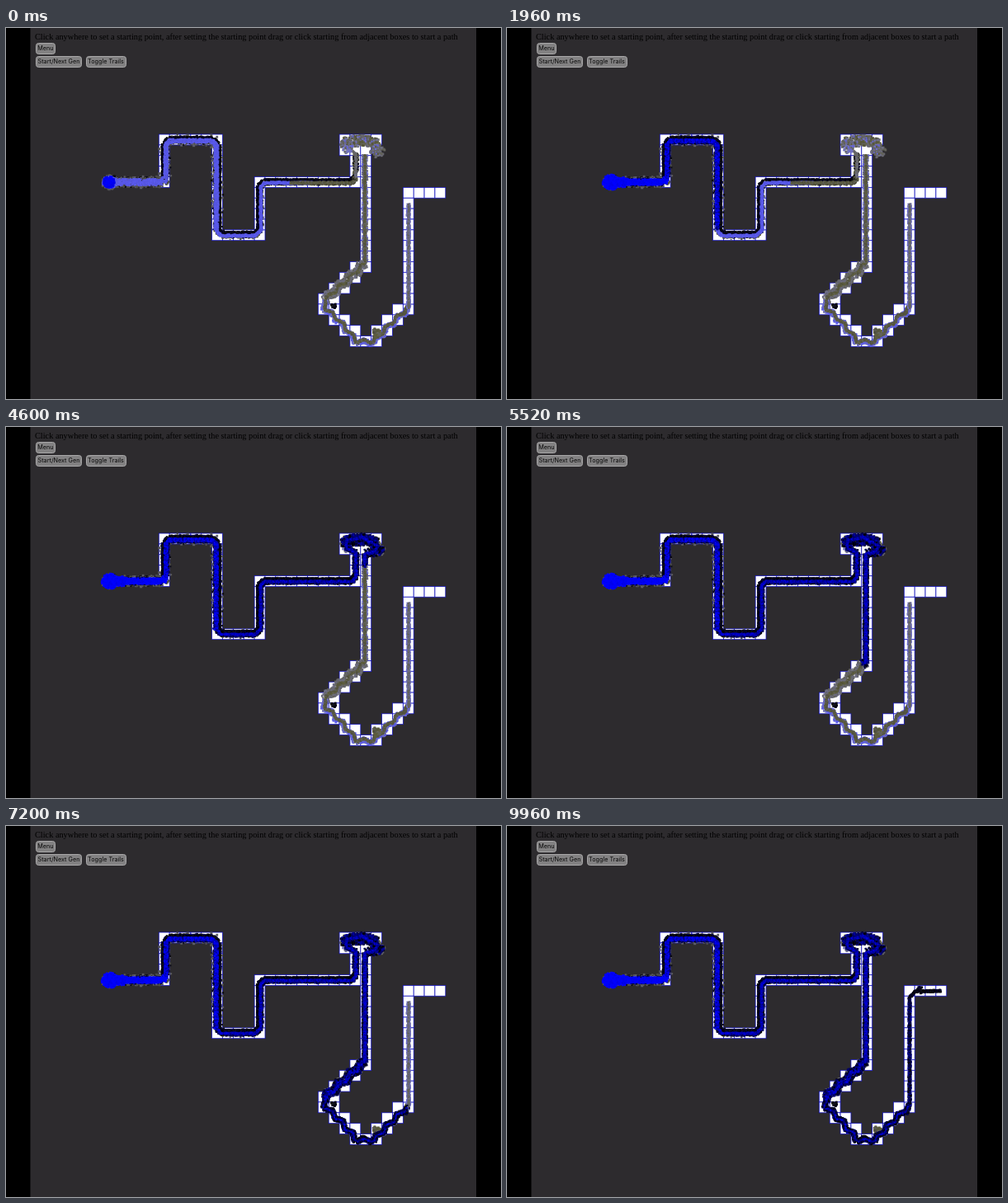
Recreate the animation shown at these times as an HTML page with a canvas. Size 600x450 px, loop 10000 ms.

```html
<!DOCTYPE html>
<html lang="en">
<head>
<meta charset="utf-8">
<title>Path swarm</title>
<style>
html, body { margin: 0; width: 100%; height: 100%; overflow: hidden; background: #000; }
#stage { position: absolute; left: 0; top: 0; width: 600px; height: 450px; overflow: hidden; }
canvas { position: absolute; left: 0; top: 0; }
p { position: absolute; left: 35px; top: 5px; margin: 0; white-space: nowrap; color: #000;
  font: 10.31px/12px "Liberation Serif", Times, serif; }
.button { position: absolute; box-sizing: border-box; height: 14px; border: 1px solid #a9a8a9;
  border-radius: 3.5px; background: #828182; color: #080808; text-align: center; white-space: nowrap;
  font: 7.25px/12px Inter, Arial, sans-serif; }
</style>
</head>
<body>
<div id="stage">
  <canvas id="view" width="600" height="450"></canvas>
  <p>Click anywhere to set a starting point, after setting the starting point drag or click starting from adjacent boxes to start a path</p>
  <div class="button" style="left:36px;top:18px;width:24px">Menu</div>
  <div class="button" style="left:36px;top:34px;width:56px">Start/Next Gen</div>
  <div class="button" style="left:96.5px;top:34px;width:49px">Toggle Trails</div>
</div>
<script>
const LOOP = 10000;
const CELL = 12.87, GRID_X = 185.3, GRID_Y = 129;
const ctx = document.getElementById('view').getContext('2d');

let seed = 77;
function rand() {
  seed = (seed * 1664525 + 1013904223) >>> 0;
  return seed / 4294967296;
}
const spread = r => (rand() * 2 - 1) * r;
const pick = list => list[Math.floor(rand() * list.length)];

// The route of the swarm and the distance to each of its points.
const route = [
  [125,187],[190,187],[193,182],[193,141],[198,136],[250,136],[256,142],[256,246],
  [261,251],[302,251],[308,245],[308,192],[313,187],[419,187],[424,181],[424,152],
  [412,146],[413,137],[432,134],[451,144],[446,152],[435,154],[435,286],[385,331],
  [387,341],[404,356],[425,381],[446,381],[465,361],[488,340],[488,208],[494,201],[526,200]
];
const reach = [0];
for (let i = 1; i < route.length; i++) {
  const [a, b] = [route[i - 1], route[i]];
  reach.push(reach[i - 1] + Math.hypot(b[0] - a[0], b[1] - a[1]));
}

function distanceAt(index) {
  const i = Math.min(Math.floor(index), route.length - 2);
  return reach[i] + (reach[i + 1] - reach[i]) * (index - i);
}

// On the diagonal stairs the swarm weaves once per step.
function weave(s) {
  const onStairs = s > reach[22] && s < reach[29];
  return onStairs ? 1.8 * Math.sin((s - reach[22]) * 2 * Math.PI / (CELL * Math.SQRT2)) : 0;
}

function pointAt(s, offset) {
  let i = 0;
  while (i < route.length - 2 && reach[i + 1] < s) i++;
  const [a, b] = [route[i], route[i + 1]];
  const length = reach[i + 1] - reach[i];
  const dx = (b[0] - a[0]) / length, dy = (b[1] - a[1]) / length;
  const d = s - reach[i], side = offset + weave(s);
  return [a[0] + dx * d - dy * side, a[1] + dy * d + dx * side];
}

// Rough band of dots along the route between two point indices.
function band(from, to, width, offset, density, colors, size = 2.2) {
  const dots = [], start = distanceAt(from), end = distanceAt(to);
  const count = Math.round((end - start) * density);
  const reachAside = Math.max(0, width - size) / 2;
  for (let i = 0; i < count; i++) {
    const s = start + (end - start) * i / count;
    const [x, y] = pointAt(s, offset + spread(reachAside));
    dots.push({ x, y, s: s + spread(4), size: size * (0.75 + rand() * 0.5), color: pick(colors) });
  }
  return dots;
}

function blob(x, y, rx, ry, count, colors, s, size = 2.8) {
  return Array.from({ length: count }, () => {
    const angle = rand() * Math.PI * 2, r = Math.sqrt(rand());
    return { x: x + Math.cos(angle) * rx * r, y: y + Math.sin(angle) * ry * r, s, size, color: pick(colors) };
  });
}

function paint(g, dots, head = Infinity) {
  for (const d of dots) {
    if (d.s > head) continue;
    g.fillStyle = d.color;
    g.fillRect(d.x - d.size / 2, d.y - d.size / 2, d.size, d.size);
  }
}

const LIGHT = ['#5858e6', '#5b5bee', '#5555dc'];
const HAZE = ['#7070c4', '#6666d0', '#7474a8'];
const OLIVE = ['#56563a', '#5e5e3c', '#62625a', '#505040'];
const GRAY = ['#66666e', '#6e6e84', '#62625a'];
const DARK = ['#000', '#000014', '#000030', '#101018'];
const NAVY = ['#000008', '#000032', '#000064', '#000096'];
const BLUE = ['#0000ff', '#0000fa', '#0000eb'];
const DEEP = ['#0000c8', '#0000a0', '#0000dc', '#000082'];
const FRINGE = ['#56565a', '#4d4d48', '#0a0a10', '#5c5c66'];

function cells(g, col, row, cols, rows) {
  for (let c = col; c < col + cols; c++) {
    for (let r = row; r < row + rows; r++) {
      const x = GRID_X + c * CELL, y = GRID_Y + r * CELL;
      g.fillRect(x, y, CELL, CELL);
      g.strokeRect(x, y, CELL, CELL);
    }
  }
}

function makeBackdrop() {
  const canvas = document.createElement('canvas');
  canvas.width = 600;
  canvas.height = 450;
  const g = canvas.getContext('2d');
  g.fillStyle = '#000';
  g.fillRect(0, 0, 600, 450);
  g.fillStyle = '#2d2b2e';
  g.fillRect(29.5, 0, 540.5, 450);

  g.fillStyle = '#fff';
  g.strokeStyle = '#1010c0';
  g.lineWidth = 0.75;
  cells(g, 0, 0, 1, 5);
  cells(g, 1, 0, 5, 1);
  cells(g, 5, 1, 1, 9);
  cells(g, 6, 9, 4, 1);
  cells(g, 9, 4, 1, 5);
  cells(g, 10, 4, 9, 1);
  cells(g, 17, 0, 4, 1);
  cells(g, 17, 1, 2, 1);
  cells(g, 18, 2, 1, 2);
  cells(g, 19, 1, 1, 12);
  for (let i = 0; i < 4; i++) cells(g, 18 - i, 12 + i, 2, 1);
  cells(g, 15, 16, 2, 1);
  cells(g, 16, 17, 2, 1);
  cells(g, 17, 18, 2, 1);
  cells(g, 18, 19, 3, 1);
  for (let i = 0; i < 3; i++) cells(g, 20 + i, 18 - i, 2, 1);
  cells(g, 23, 5, 1, 11);
  cells(g, 24, 5, 3, 1);

  const layers = [
    band(0, 2, 14, 0, 6, FRINGE),
    band(0, 7, 17, 0, 0.8, FRINGE, 2.6),
    band(7, 9, 14, 0, 0.4, FRINGE),
    blob(126, 187, 10, 9, 130, FRINGE, 0),
    blob(126, 187, 9, 7, 100, LIGHT, 0),
    band(2, 7, 11, 0, 5, DARK.concat(OLIVE)),
    band(7, 14, 9, 0, 5, DARK.concat(OLIVE)),
    band(2, 14, 4, -3, 3, DARK),
    band(0, 2, 10, 0, 6, LIGHT),
    band(2, 7, 7, 1, 5, LIGHT),
    band(7, 12.55, 5, 1, 5, LIGHT),
    band(12.3, 14, 5, 1, 4, OLIVE),
    band(13.5, 15, 8, 0, 4, DARK.concat(OLIVE)),
    band(14, 16, 4, 0, 3, GRAY),
    blob(429, 137, 23, 7, 210, OLIVE.concat(GRAY), 0),
    blob(413, 143, 8, 9, 90, GRAY.concat(HAZE), 0),
    blob(450, 149, 9, 8, 80, GRAY, 0),
    band(16, 20, 12, 0, 2, HAZE.concat(OLIVE, GRAY)),
    band(21, 22, 8, 0, 5, GRAY.concat(HAZE)),
    band(21, 22, 4, 0, 3, OLIVE),
    band(22, 23, 14, 0, 8, GRAY),
    band(22, 23, 5, 0, 2, OLIVE),
    band(23, 29, 9, 0, 6, HAZE.concat(LIGHT)),
    band(23, 29, 5, -1, 4, OLIVE),
    blob(449, 370, 5, 6, 40, OLIVE, 0),
    blob(397, 337, 4, 3, 15, DARK, 0),
    band(29, 29.96, 6, 0, 5, HAZE),
    band(29, 29.96, 3, 0, 2, GRAY)
  ];
  layers.forEach(dots => paint(g, dots));
  return canvas;
}

const backdrop = makeBackdrop();

const trail = [
  band(0, 2, 11, 0, 3, NAVY),
  band(2, 7, 11, 0, 5, NAVY),
  band(7, 14, 9, 0, 6, NAVY),
  band(2, 14, 3, -3, 1.5, DARK),
  band(14, 16, 9, 0, 6, NAVY),
  band(16, 21, 13, 0, 6, NAVY),
  blob(429, 137, 23, 7, 190, NAVY, distanceAt(18)),
  blob(450, 149, 8, 8, 70, NAVY, distanceAt(20)),
  band(21, 22, 8, 0, 6, NAVY),
  band(22, 23, 14, 0, 9, NAVY),
  band(23, 29, 9, 0, 7, DARK.concat(NAVY)),
  band(29, 30, 5, 0, 4, NAVY),
  band(30, 32, 5, 0, 5, DARK),
  blob(501, 199, 4, 4, 20, DARK, distanceAt(31.3)),
  blob(125, 187, 7, 7, 100, BLUE, -1),
  blob(127, 187, 11, 9, 150, BLUE, 12),
  blob(139, 187, 10, 6, 60, BLUE, 24),
  band(0, 2, 9, 0, 6, BLUE),
  band(2, 7, 6, 1, 4, BLUE.concat(DEEP)),
  band(7, 14, 4, 0.5, 2.5, DEEP),
  band(14, 21, 5, 0, 1.4, DEEP),
  band(21, 22, 4, 0, 3, DEEP),
  band(22, 23, 6, 0, 1.5, DEEP),
  band(23, 29, 4, 0, 0.6, DEEP)
].flat();

// Time against position on the route; the swarm rests at the end.
const progress = [
  [0, 0], [1960, 6.95], [3200, 12.4], [4600, 21.1], [5520, 22.03],
  [7200, 28.9], [8200, 30], [8550, 32], [LOOP, 32]
].map(([time, index]) => [time, distanceAt(index)]);

function headAt(t) {
  const i = progress.findIndex(([time]) => time > t);
  const [[t0, s0], [t1, s1]] = [progress[i - 1], progress[i]];
  return s0 + (s1 - s0) * (t - t0) / (t1 - t0) + (s1 === s0 ? 5 : 0);
}

function draw(now) {
  const t = now % LOOP;
  ctx.drawImage(backdrop, 0, 0);
  paint(ctx, trail, t < 40 ? -0.5 : headAt(t));
  requestAnimationFrame(draw);
}
requestAnimationFrame(draw);
</script>
</body>
</html>
```
